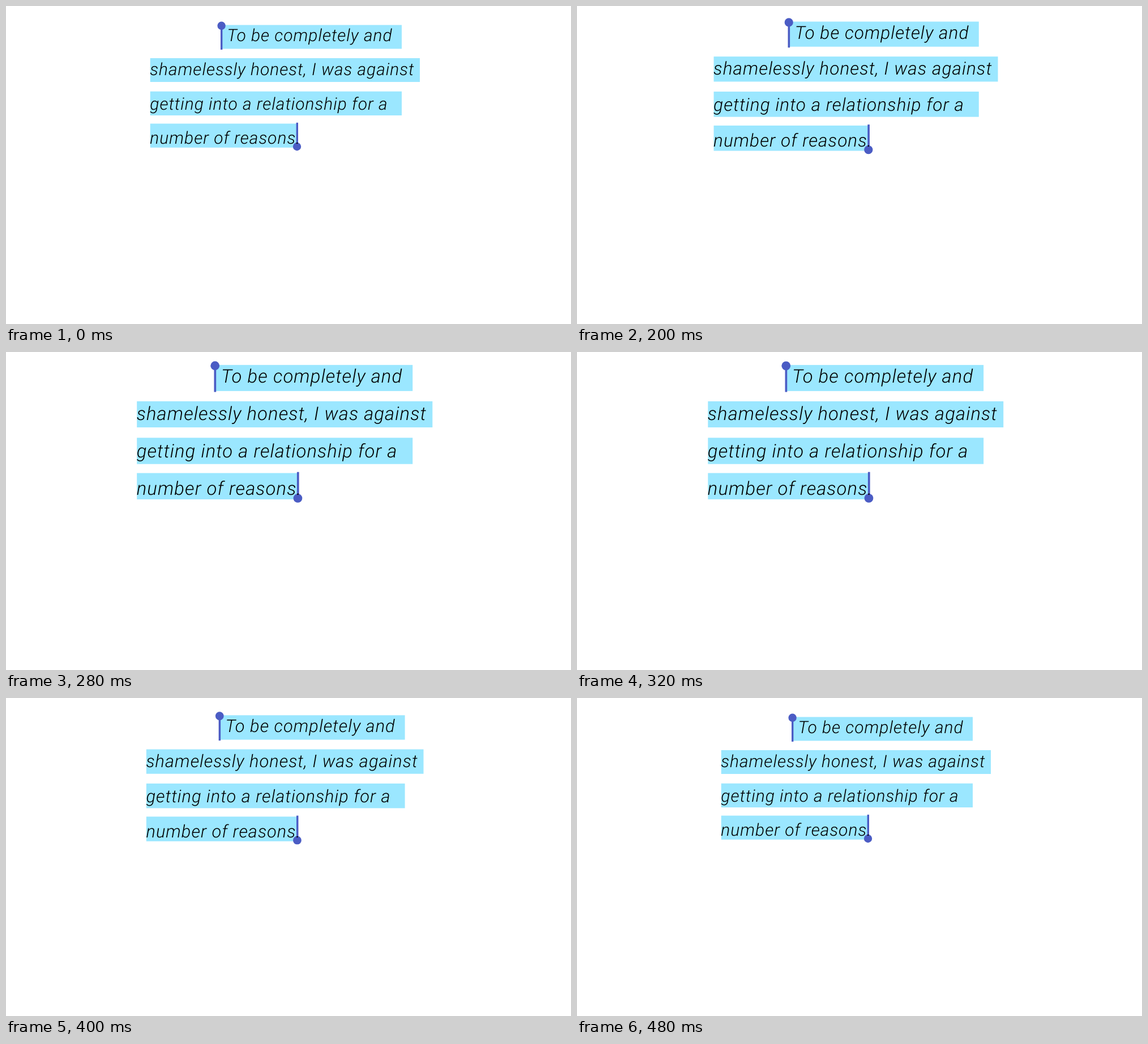
Write an HTML page that moves like this. It is 998x561 px and loops after 1560 ms.

```html
<!DOCTYPE html>
<html lang="en">
<head>
<meta charset="utf-8">
<title>Selected text pulse</title>
<style>
  html, body { margin: 0; width: 100%; height: 100%; overflow: hidden; background: #fff; }
  svg { display: block; width: 998px; height: 561px; }
  .bars { fill: #9be7ff; }
  .handles { fill: #4b5cc4; }
  text {
    font: italic 300 30px Roboto, sans-serif;
    letter-spacing: 0.98px;
    text-rendering: geometricPrecision;
    fill: #000;
  }
</style>
</head>
<body>
<svg viewBox="0 0 998 561">
  <g id="note">
    <g class="bars">
      <rect x="381" y="33.5" width="318" height="42"/>
      <rect x="254.7" y="92" width="476.3" height="42"/>
      <rect x="254.7" y="150.7" width="444.3" height="42.3"/>
      <rect x="254.7" y="207.5" width="259.8" height="42.3"/>
    </g>
    <g class="handles">
      <rect x="379" y="35" width="3.4" height="42"/>
      <circle cx="380.6" cy="34.8" r="7.2"/>
      <rect x="512.6" y="205.8" width="3.4" height="42"/>
      <circle cx="514" cy="248" r="7.2"/>
    </g>
    <text x="390.5" y="62">To be completely and</text>
    <text x="254.3" y="122.3">shamelessly honest, I was against</text>
    <text x="254.3" y="182.6">getting into a relationship for a</text>
    <text x="254.3" y="242.9">number of reasons.</text>
  </g>
</svg>
<script>
  const LOOP = 1560, TICK = 40, GROWTH = 0.0962;
  const CENTER = { x: 499, y: 144.4 };
  const RISE = [130, 260], FALL = [314, 449];
  const note = document.getElementById('note');

  function ease(time, [start, end]) {
    const p = Math.min(1, Math.max(0, (time - start) / (end - start)));
    return (1 - Math.cos(Math.PI * p)) / 2;
  }

  function draw(now) {
    const time = Math.floor((now % LOOP) / TICK) * TICK;
    const scale = 1 + GROWTH * (ease(time, RISE) - ease(time, FALL));
    const { x, y } = CENTER;
    note.setAttribute('transform',
      `translate(${x} ${y}) scale(${scale}) translate(${-x} ${-y})`);
  }

  const origin = performance.now();
  function frame() {
    draw(performance.now() - origin);
    requestAnimationFrame(frame);
  }
  frame();
</script>
</body>
</html>
```
